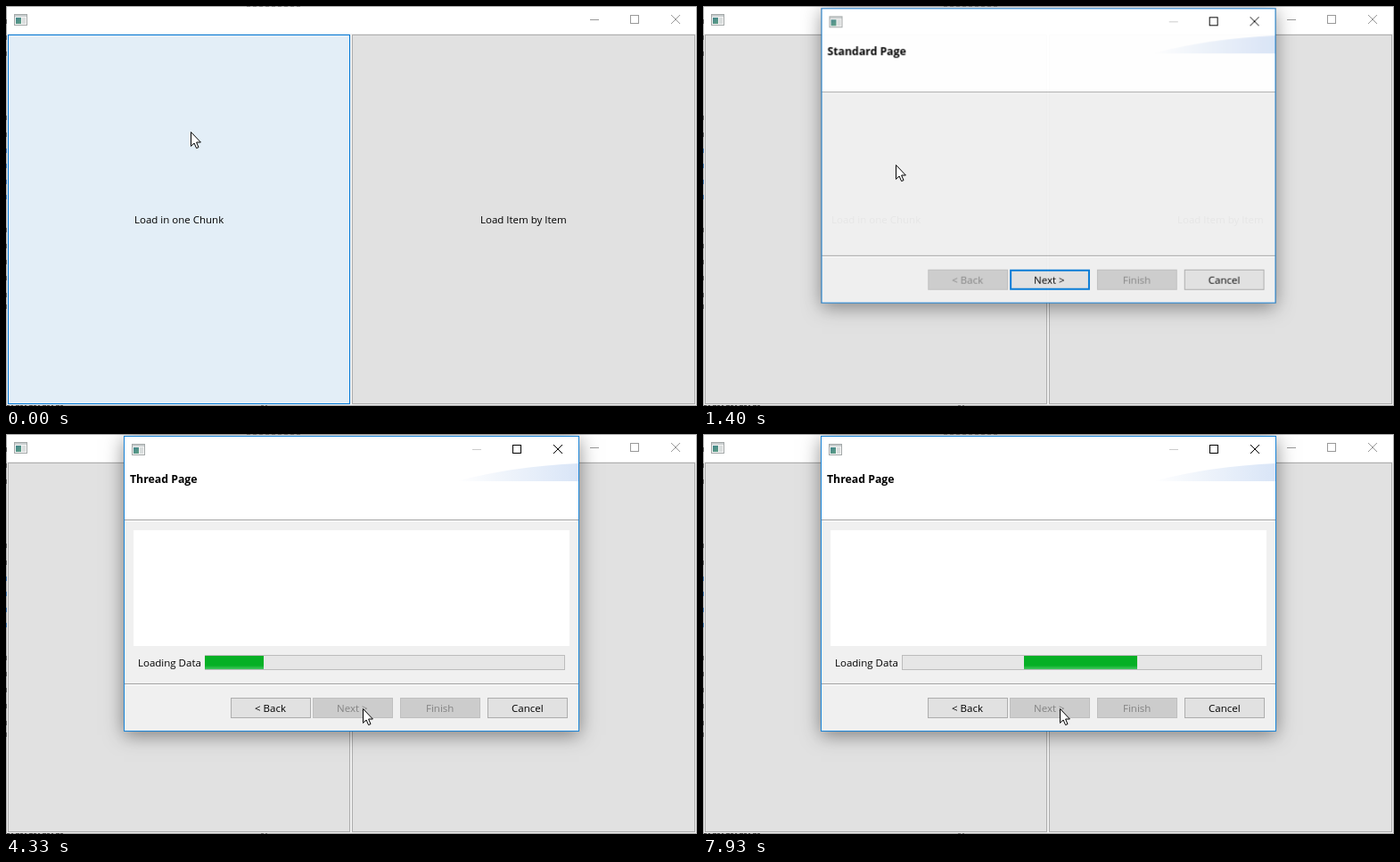
These frames come from a looping animation (775 px wide and 449 px high, 8000 ms). An HTML page with a canvas:

```html
<!DOCTYPE html>
<html lang="en">
<head>
<meta charset="utf-8">
<title>Wizard loading demo</title>
<style>
  html, body { margin: 0; width: 100%; height: 100%; overflow: hidden; background: #f0f0f0; }
  canvas { display: block; width: 775px; height: 449px; }
</style>
</head>
<body>
<canvas id="stage" width="775" height="449"></canvas>
<script>
const W = 775, H = 449, LOOP = 8000, TICK = 1000 / 15;
const REGULAR = '11.5px "Open Sans", "Noto Sans", sans-serif';
const BOLD = 'bold 12.3px "Open Sans", "Noto Sans", sans-serif';
const BLUE = '#0078d7', FACE = '#e1e1e1', EDGE = '#adadad';

const stage = document.getElementById('stage').getContext('2d');
const layer = document.createElement('canvas');
layer.width = W;
layer.height = H;
const dialogCtx = layer.getContext('2d');

// [time, x, y] of the pointer tip
const POINTER = [
  [0, 207, 141], [200, 207, 144], [730, 216, 177], [1100, 216, 177],
  [1130, 216, 178], [1670, 216, 178], [1870, 248, 183], [2200, 366, 211],
  [2400, 396, 281], [2530, 402, 311], [2670, 400, 308]
];
// [time, opacity, scale] of the opening dialog
const OPENING = [
  [1130, 0, .93], [1200, .33, .964], [1270, .64, .985],
  [1330, .84, .994], [1400, .96, .998], [1470, 1, 1]
];

function sample(keys, t) {
  if (t <= keys[0][0]) return keys[0].slice(1);
  for (let i = 1; i < keys.length; i++) {
    const a = keys[i - 1], b = keys[i];
    if (t < b[0]) {
      const p = (t - a[0]) / (b[0] - a[0]);
      return a.slice(1).map((v, j) => v + (b[j + 1] - v) * p);
    }
  }
  return keys[keys.length - 1].slice(1);
}

function blend(from, to, p) {
  p = Math.max(0, Math.min(1, p));
  const part = (c, i) => parseInt(c.slice(i, i + 2), 16);
  return 'rgb(' + [1, 3, 5].map(i => Math.round(part(from, i) + (part(to, i) - part(from, i)) * p)) + ')';
}

function rect(c, x, y, w, h, fill) {
  c.fillStyle = fill;
  c.fillRect(x, y, w, h);
}

function box(c, x, y, w, h, fill, edge, line = 1) {
  rect(c, x, y, w, h, edge);
  rect(c, x + line, y + line, w - 2 * line, h - 2 * line, fill);
}

function text(c, str, x, y, color = '#000', font = REGULAR) {
  c.font = font;
  c.fillStyle = color;
  c.fillText(str, x, y);
}

function appIcon(c, x, y) {
  box(c, x, y, 15, 13, '#f4f4f4', '#a3a8a8');
  rect(c, x + 1, y + 1, 13, 2, '#c9cecf');
  const g = c.createLinearGradient(x, y + 3, x + 6, y + 11);
  g.addColorStop(0, '#3d7f8c');
  g.addColorStop(1, '#5c9c86');
  rect(c, x + 2, y + 4, 6, 7, g);
  rect(c, x + 9, y + 4, 4, 7, '#d9dddd');
}

function controls(c, x, y, color, minColor) {
  rect(c, x, y + 5, 10, 1, minColor);
  c.strokeStyle = color;
  c.lineWidth = 1;
  c.strokeRect(x + 45.5, y + .5, 9, 9);
  c.beginPath();
  c.moveTo(x + 91, y);
  c.lineTo(x + 101, y + 10);
  c.moveTo(x + 101, y);
  c.lineTo(x + 91, y + 10);
  c.stroke();
}

// Traces of the desktop showing through the thin inactive border
function desktopTraces(c) {
  [18, 36, 54, 126, 145, 163, 180, 198, 215, 252, 270, 288, 306, 325, 338].forEach((y, i) => {
    rect(c, 0, y - 3, 1, 5, i > 4 && i < 9 ? '#3a6ea5' : '#555');
  });
  for (let x = 1; x < 62; x += 5) rect(c, x, 448, x % 3 + 2, 1, '#444');
  for (let x = 270; x < 330; x += 7) rect(c, x, 0, 4, 1, '#777');
  rect(c, 286, 448, 3, 1, '#666');
  rect(c, 291, 448, 2, 1, '#666');
}

function drawMain(c, t) {
  const active = t >= 930 && t < 1130;
  box(c, 0, 0, W, H, '#f0f0f0', active ? '#1883d7' : '#a9a9a9');
  if (!active) desktopTraces(c);
  rect(c, 1, 1, W - 2, 30, '#fff');
  appIcon(c, 9, 9);
  const ink = active ? '#000' : '#999';
  controls(c, 655, 10, ink, ink);

  let fill = FACE, edge = EDGE;
  if (active) {
    fill = '#cce4f7';
    edge = '#005499';
  } else if (t < 930) {
    fill = blend('#e3eef7', '#e5f1fb', t / 200);
    edge = BLUE;
  }
  box(c, 2, 32, 384, 415, fill, edge);
  box(c, 388, 32, 385, 415, FACE, EDGE);
  text(c, 'Load in one Chunk', 144, 244);
  text(c, 'Load Item by Item', 532, 244);
}

function button(c, label, x, textX, state = {}) {
  const { fill = FACE, edge = EDGE, line = 1, ink = '#000' } = state;
  box(c, x, 296, 90, 23, fill, edge, line);
  text(c, label, textX, 312, ink);
}

const DISABLED = { fill: '#cccccc', edge: '#bfbfbf', ink: '#838383' };

function nextState(t) {
  if (t >= 3130) return DISABLED;
  if (t >= 2800) return { fill: blend('#e5f1fb', '#cce4f7', (t - 2735) / 130), edge: '#005499' };
  return { fill: blend(FACE, '#e5f1fb', (t - 2460) / 200), edge: BLUE, line: t < 2530 ? 2 : 1 };
}

function backState(t) {
  if (t < 3200) return DISABLED;
  const p = (t - 3270) / 270;
  return { fill: blend('#cccccc', FACE, p), edge: blend('#bfbfbf', EDGE, p) };
}

function drawProgress(c, t) {
  box(c, 223, 248, 404, 17, '#e6e6e6', '#bcbcbc');
  const step = Math.floor((t - 4466.7) / (1200 / 11) + 11.5);
  if (step < 0) return;
  const right = 229 + 6 * step, left = Math.max(223, right - 127);
  const g = c.createLinearGradient(0, 249, 0, 264);
  g.addColorStop(0, '#06b025');
  g.addColorStop(.72, '#06b025');
  g.addColorStop(1, step ? '#45c660' : '#06b025');
  rect(c, left, 249, right - left, 15, g);
}

function headerSwoosh(c) {
  const g = c.createLinearGradient(505, 0, 642, 0);
  g.addColorStop(0, '#ffffff');
  g.addColorStop(.4, '#eff4fb');
  g.addColorStop(1, '#d9e5f7');
  c.fillStyle = g;
  c.beginPath();
  c.moveTo(505, 53);
  c.quadraticCurveTo(570, 36, 642, 33);
  c.lineTo(642, 53);
  c.fill();
}

function drawDialog(c, t) {
  const loading = t >= 3130;
  c.clearRect(0, 0, W, H);
  box(c, 132, 2, 511, 332, '#f0f0f0', '#1883d7');
  rect(c, 133, 3, 509, 93, '#fff');
  headerSwoosh(c);
  appIcon(c, 141, 11);
  controls(c, 523, 12, '#000', '#ccc');
  text(c, loading ? 'Thread Page' : 'Standard Page', 139, 55, '#000', BOLD);
  for (const y of [96, 280]) {
    rect(c, 133, y, 509, 1, '#a0a0a0');
    rect(c, 133, y + 1, 509, 1, '#fff');
  }
  if (loading) {
    rect(c, 143, 108, 489, 130, '#fff');
    text(c, 'Loading Data', 148, 261);
    drawProgress(c, t);
  }
  button(c, '< Back', 252, 279, backState(t));
  button(c, 'Next >', 344, 371, nextState(t));
  button(c, 'Finish', 442, 471, DISABLED);
  button(c, 'Cancel', 540, 567);
}

function placeDialog(c, t) {
  const [alpha, scale] = sample(OPENING, t);
  drawDialog(dialogCtx, t);
  c.save();
  c.globalAlpha = alpha;
  c.translate(387.5, 168);
  c.scale(scale, scale);
  c.translate(-387.5, -168);
  c.save();
  c.beginPath();
  c.rect(-20, -20, W + 40, H + 40);
  c.rect(132, 2, 511, 332);
  c.clip('evenodd');
  c.shadowColor = 'rgba(0,0,0,.45)';
  c.shadowBlur = 20;
  c.shadowOffsetY = 4;
  rect(c, 132, 2, 511, 332, '#000');
  c.restore();
  c.drawImage(layer, 0, 0);
  c.restore();
}

const ARROW = new Path2D('M.5 .5V16.4L4.1 13 6.6 18.6 9 17.6 6.6 12H11.4Z');

function drawPointer(c, t) {
  const [x, y] = sample(POINTER, t).map(Math.round);
  c.save();
  c.translate(x, y);
  c.fillStyle = '#fff';
  c.strokeStyle = '#000';
  c.lineWidth = 1;
  c.fill(ARROW);
  c.stroke(ARROW);
  c.restore();
}

function frame() {
  const now = performance.now() % LOOP;
  const tick = Math.min(119, Math.floor((now + 5) / TICK));
  const t = tick * TICK;
  drawMain(stage, t);
  if (t >= 1130) placeDialog(stage, t);
  drawPointer(stage, t);
  requestAnimationFrame(frame);
}
frame();
</script>
</body>
</html>
```
